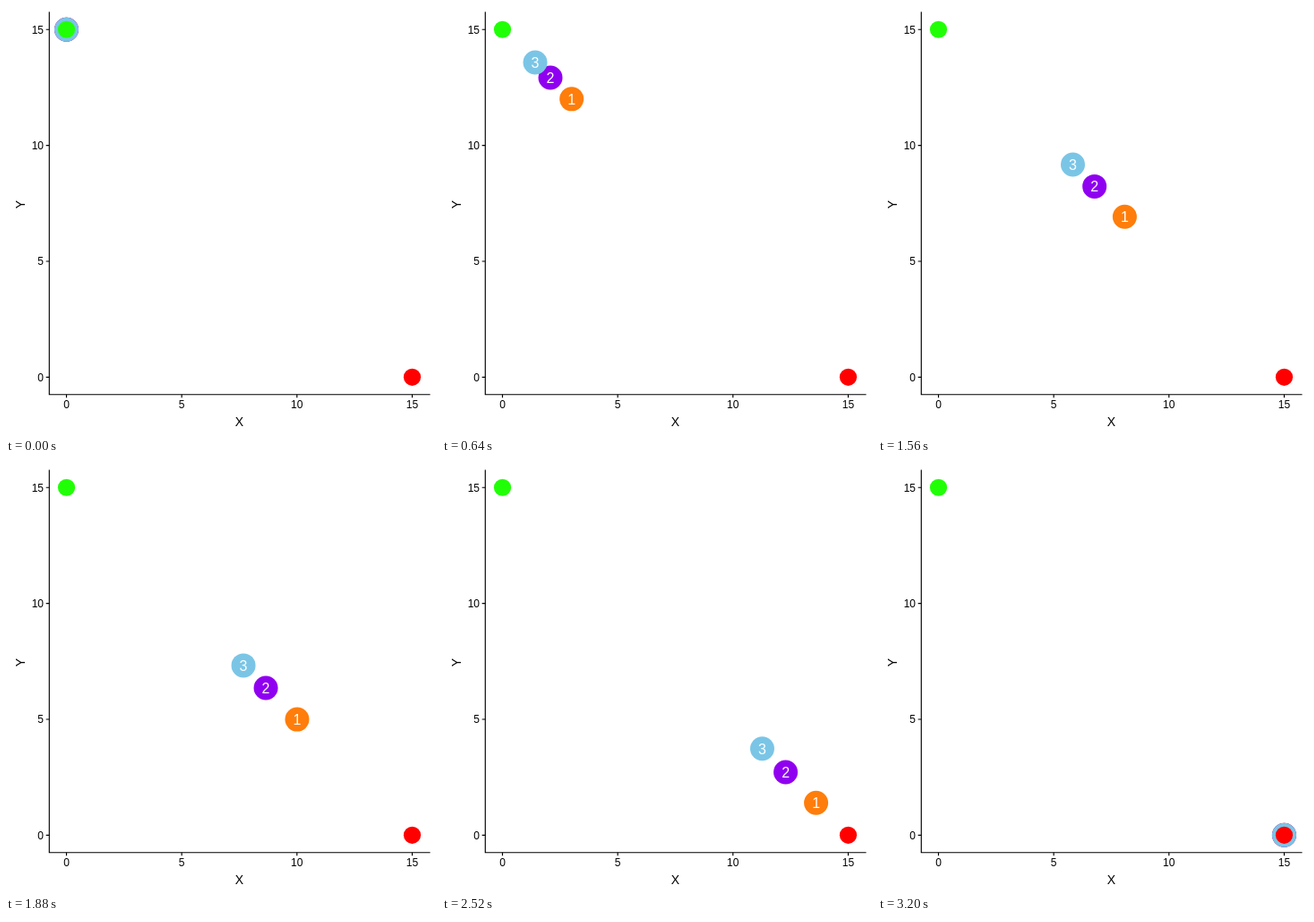
These frames come from a looping animation (480x480 px, 4000 ms). An HTML page:

```html
<!DOCTYPE html>
<html lang="en">
<head>
<meta charset="utf-8">
<title>Three runners</title>
<style>
  html, body { margin: 0; width: 100%; height: 100%; overflow: hidden; background: #fff; }
  svg { display: block; width: 100vw; height: 100vh; }
  text { font-family: "Liberation Sans", Arial, Helvetica, sans-serif; text-anchor: middle; }
  .axis { stroke: #000; stroke-width: 1.15; fill: none; }
  .tick { font-size: 12px; }
  .end { text-anchor: end; }
  .title { font-size: 14px; }
  .label { font-size: 16px; fill: #fff; }
</style>
</head>
<body>
<svg id="plot" viewBox="0 0 480 480"></svg>
<script>
const LOOP = 4000, STEP = 40, LAST = 80, GOAL = 15;

// Knots are [step, distance]; the first stretch from rest follows a power curve.
const runners = [
  { color: '#ff7d0a', power: 1.1,
    knots: [[14, 2.73], [16, 3], [27, 5.345], [28, 5.61], [39, 8.08], [42, 8.91], [56, 11.98], [69, GOAL]] },
  { color: '#9000f0', power: 1.4,
    knots: [[14, 1.83], [16, 2.08], [27, 4.18], [28, 4.42], [39, 6.77], [42, 7.56], [56, 10.61], [70, 13.96], [75, GOAL]] },
  { color: '#7ac5e6', power: 1.7,
    knots: [[14, 1.206], [16, 1.42], [27, 3.32], [28, 3.55], [39, 5.83], [42, 6.61], [56, 9.6], [70, 12.94], [80, GOAL]] }
];

const plot = document.getElementById('plot');
const px = x => 67.5 + x * 25.73;
const py = y => 414.3 - y * 25.87;

function add(tag, attrs, text) {
  const el = document.createElementNS('http://www.w3.org/2000/svg', tag);
  for (const key in attrs) el.setAttribute(key, attrs[key]);
  if (text !== undefined) el.textContent = text;
  return plot.appendChild(el);
}

function dot(x, y, r, fill) {
  return add('circle', { cx: px(x), cy: py(y), r, fill });
}

function drawAxes() {
  add('path', { class: 'axis', d: 'M48.3 6.5V434.2M47.8 433.7H473.5' });
  for (const v of [0, 5, 10, 15]) {
    add('path', { class: 'axis', d: `M${px(v)} 433.7v3.6M48.3 ${py(v)}h-3.6` });
    add('text', { class: 'tick', x: px(v), y: 449.2 }, v);
    add('text', { class: 'tick end', x: 42, y: py(v) + 4.4 }, v);
  }
  add('text', { class: 'title', x: 260.5, y: 469 }, 'X');
  add('text', { class: 'title', transform: 'translate(21 221.5) rotate(-90)' }, 'Y');
}

function distance({ knots, power }, step) {
  const [s0, d0] = knots[0];
  if (step <= s0) return d0 * (step / s0) ** power;
  const i = knots.findIndex(k => k[0] >= step);
  if (i < 0) return GOAL;
  const [a, da] = knots[i - 1], [b, db] = knots[i];
  return da + (db - da) * (step - a) / (b - a);
}

drawAxes();
for (const r of runners) r.dot = dot(0, GOAL, 13.5, r.color);
runners.forEach((r, i) => r.label = add('text', { class: 'label' }, i + 1));
dot(0, GOAL, 9.6, '#21ff06');
dot(GOAL, 0, 9.6, '#ff0000');

function render(ms) {
  const step = Math.min(LAST, Math.floor((ms % LOOP) / STEP));
  for (const r of runners) {
    const d = distance(r, step);
    const x = px(d), y = py(GOAL - d);
    r.dot.setAttribute('cx', x);
    r.dot.setAttribute('cy', y);
    r.label.setAttribute('x', x);
    r.label.setAttribute('y', y + 6);
  }
}

const start = performance.now();
function tick() {
  render(performance.now() - start);
  requestAnimationFrame(tick);
}
tick();
</script>
</body>
</html>
```
